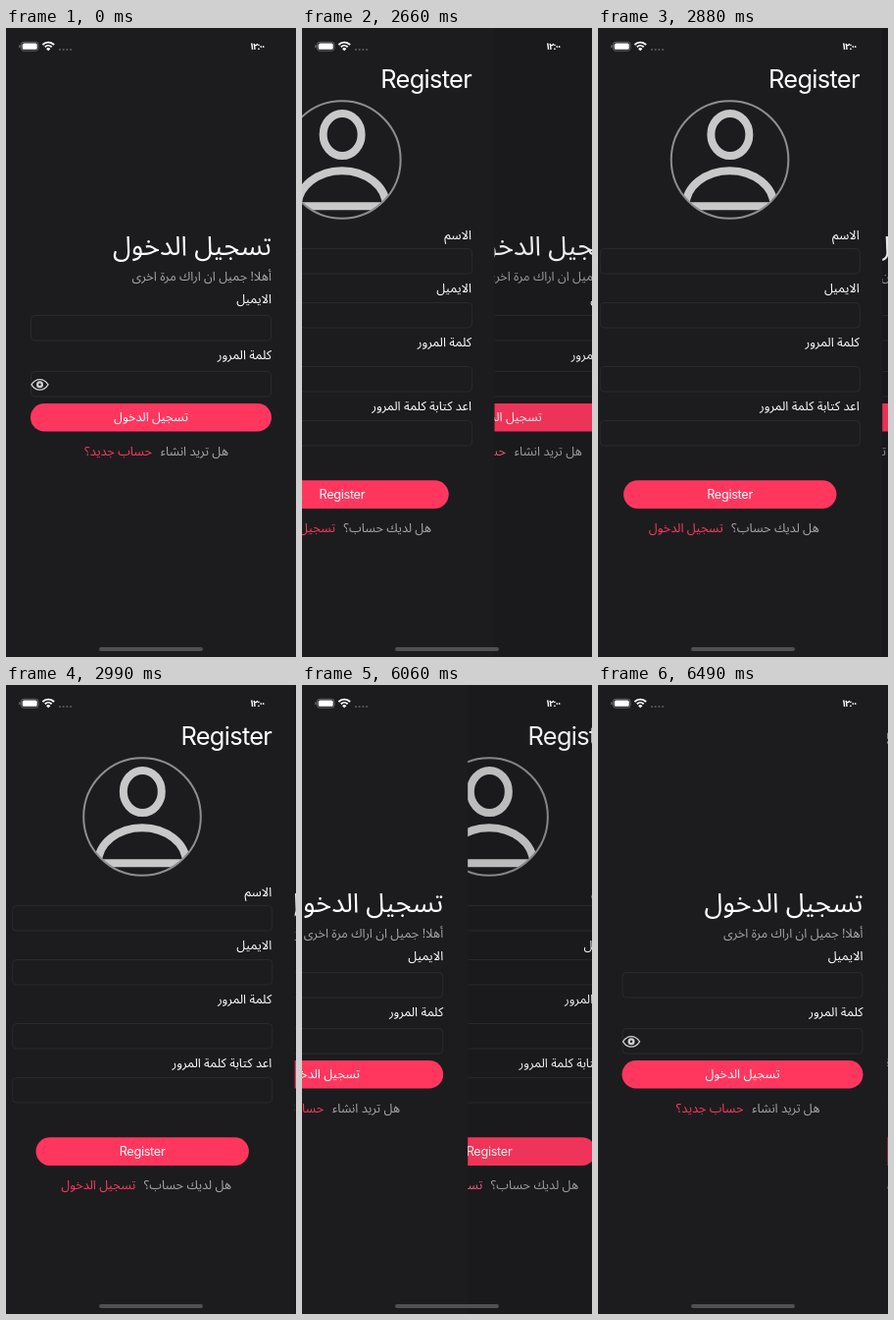
Animation of 296 by 640 pixels, one loop 6.51 s. Source, as an HTML page with a canvas:

```html
<!DOCTYPE html>
<html lang="ar">
<head>
<meta charset="utf-8">
<title>تسجيل الدخول</title>
<style>
html, body { margin: 0; width: 100%; height: 100%; overflow: hidden; background: #1c1c1e; }
canvas { display: block; width: 296px; height: 640px; }
</style>
</head>
<body>
<canvas id="stage"></canvas>
<script>
const W = 296, H = 640, LOOP = 6510;
const BG = '#1c1c1e', PINK = '#ff375f', PRESSED = '#ff607f', WHITE = '#fff', GRAY = '#a6a6aa', LINE = '#2a2a2c';
const ARABIC = '"Noto Sans Arabic", "DejaVu Sans", sans-serif';
const LATIN = 'Inter, "Liberation Sans", sans-serif';

const canvas = document.getElementById('stage');
const ctx = canvas.getContext('2d');
const dpr = window.devicePixelRatio || 1;
canvas.width = W * dpr;
canvas.height = H * dpr;

// Body size from the metrics of whichever Arabic font is present
ctx.font = '100px ' + ARABIC;
const BODY = 76 / ctx.measureText('تسجيل الدخول').width * 100;
const TITLE = BODY * 162 / 76;

function text(str, x, y, { size = BODY, color = WHITE, align = 'right', family = ARABIC, weight = 400, gap = 0 } = {}) {
  ctx.font = `${weight} ${size}px ${family}`;
  ctx.letterSpacing = gap + 'px';
  ctx.direction = family === LATIN ? 'ltr' : 'rtl';
  ctx.textAlign = align;
  ctx.fillStyle = color;
  ctx.fillText(str, x, y);
}

function pill(x, y, w, h, r, color) {
  ctx.beginPath();
  ctx.roundRect(x, y, w, h, r);
  ctx.fillStyle = color;
  ctx.fill();
}

function field(x, y, w) {
  ctx.beginPath();
  ctx.roundRect(x + 0.5, y + 0.5, w - 1, 25.5, 4);
  ctx.strokeStyle = LINE;
  ctx.lineWidth = 1;
  ctx.stroke();
}

function disc(x, y, r, color) {
  ctx.beginPath();
  ctx.arc(x, y, r, 0, 2 * Math.PI);
  ctx.fillStyle = color;
  ctx.fill();
}

function eye(x, y) {
  ctx.strokeStyle = '#d0d0d2';
  ctx.lineWidth = 1.3;
  ctx.beginPath();
  ctx.moveTo(x - 8.5, y);
  ctx.bezierCurveTo(x - 4, y - 7, x + 4, y - 7, x + 8.5, y);
  ctx.bezierCurveTo(x + 4, y + 7, x - 4, y + 7, x - 8.5, y);
  ctx.closePath();
  ctx.stroke();
  disc(x, y, 3.5, '#d0d0d2');
  disc(x, y, 1.2, BG);
}

function avatar(x, y) {
  ctx.save();
  ctx.beginPath();
  ctx.arc(x, y, 59.5, 0, 2 * Math.PI);
  ctx.clip();
  ctx.strokeStyle = '#c8c8c8';
  ctx.lineWidth = 8;
  ctx.beginPath();
  ctx.ellipse(x + 0.3, y - 25.5, 19.5, 21.5, 0, 0, 2 * Math.PI);
  ctx.stroke();
  ctx.beginPath();
  ctx.ellipse(x, y + 47.2, 45, 36, 0, Math.PI, 2 * Math.PI);
  ctx.closePath();
  ctx.stroke();
  ctx.restore();
  ctx.beginPath();
  ctx.arc(x, y, 59.8, 0, 2 * Math.PI);
  ctx.strokeStyle = '#8e8e90';
  ctx.lineWidth = 2;
  ctx.stroke();
}

function login(pressed) {
  text('تسجيل الدخول', 271, 231, { size: TITLE });
  text('أهلا! جميل ان اراك مرة اخرى', 271, 257, { color: GRAY });
  text('الايميل', 271, 280);
  field(25, 292, 246);
  text('كلمة المرور', 271, 337);
  field(25, 349, 246);
  eye(34.5, 362.8);
  pill(25, 382, 246, 28.5, 14.2, PINK);
  text('تسجيل الدخول', 148, 400, { align: 'center' });
  text('هل تريد انشاء', 227, 435, { color: GRAY });
  text('حساب جديد؟', 149, 435, { color: pressed ? PRESSED : PINK });
}

function register(pressed) {
  text('Register', 272.5, 61, { size: 25.4, family: LATIN, gap: -0.7 });
  avatar(140.3, 134);
  const rows = [['الاسم', 215, 224], ['الايميل', 269, 279], ['كلمة المرور', 324, 344], ['اعد كتابة كلمة المرور', 389, 399]];
  for (const [label, base, top] of rows) {
    text(label, 272.5, base);
    field(7.5, top, 266);
  }
  pill(31.8, 460.3, 217.4, 28.6, 14.3, PINK);
  text('Register', 140.3, 479, { size: 12.7, family: LATIN, align: 'center', gap: -0.3 });
  text('هل لديك حساب؟', 231.5, 513, { color: GRAY });
  text('تسجيل الدخول', 133.5, 513, { color: pressed ? PRESSED : PINK });
}

function page(draw, x, pressed) {
  ctx.save();
  ctx.translate(x, 0);
  ctx.fillStyle = BG;
  ctx.fillRect(0, 0, W, H);
  draw(pressed);
  ctx.restore();
}

// Right-to-left push: the new page enters from the left, the old one lags behind and dims
function push(under, over, ms) {
  const k = 0.0156 * Math.max(0, ms);
  const rest = (1 + k) * Math.exp(-k);
  page(under, 0.3 * W * (1 - rest), true);
  ctx.fillStyle = `rgba(0,0,0,${0.1 * (1 - rest)})`;
  ctx.fillRect(0, 0, W, H);
  page(over, -W * rest, false);
}

function chrome() {
  // battery
  ctx.beginPath();
  ctx.roundRect(15.4, 14.3, 17.6, 8.8, 2.7);
  ctx.strokeStyle = '#77777a';
  ctx.lineWidth = 0.8;
  ctx.stroke();
  pill(16.7, 15.6, 15, 6.2, 1.6, WHITE);
  pill(13.3, 17.2, 1.2, 3, 0.6, '#77777a');
  // wifi
  ctx.strokeStyle = WHITE;
  ctx.lineWidth = 1.9;
  for (const r of [4.7, 8]) {
    ctx.beginPath();
    ctx.arc(43.2, 22.6, r, -Math.PI * 0.76, -Math.PI * 0.24);
    ctx.stroke();
  }
  ctx.beginPath();
  ctx.moveTo(43.2, 23.2);
  ctx.arc(43.2, 23.2, 2.9, -Math.PI * 0.76, -Math.PI * 0.24);
  ctx.fillStyle = WHITE;
  ctx.fill();
  // signal
  for (let i = 0; i < 4; i++) disc(55 + i * 3.7, 22, 1.1, '#58585b');
  text('١٢:٠٠', 256.5, 22.3, { size: 9.8, weight: 700, align: 'center', gap: -0.8 });
  pill(95, 630, 106, 4, 2, '#505053');
}

const IN = [2540, 2650, 2770, 2880, 2990];
const OUT = [6060, 6170, 6280, 6380, 6490];
const held = (times, t) => times.filter(s => s <= t).pop();

function render(t) {
  ctx.setTransform(dpr, 0, 0, dpr, 0, 0);
  if (t < IN[0]) page(login, 0, t >= 2230);
  else if (t < 5940) push(login, register, held(IN, t) - 2504);
  else if (t < OUT[0]) page(register, 0, true);
  else push(register, login, held(OUT, t) - 5937);
  chrome();
}

const start = performance.now();
function tick() {
  render((performance.now() - start) % LOOP);
  requestAnimationFrame(tick);
}
tick();
</script>
</body>
</html>
```
